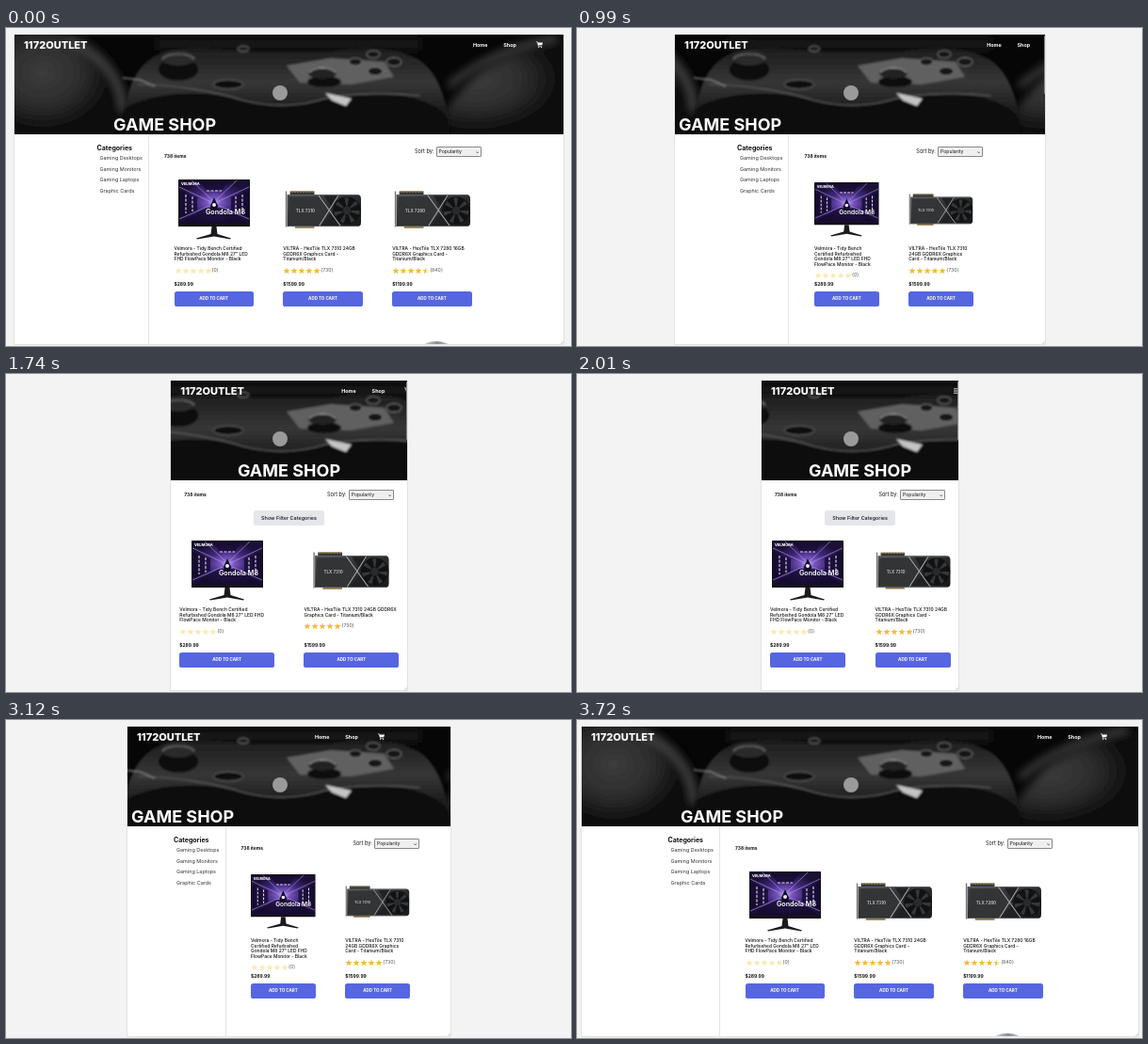
An HTML page for the animation above (3.99 s loop, 600x338 px).

```html
<!DOCTYPE html>
<html lang="en">
<head>
<meta charset="utf-8">
<title>Responsive shop</title>
<style>
html, body { margin: 0; width: 100%; height: 100%; overflow: hidden; background: #f3f3f3; }
.stage { position: relative; width: 600px; height: 338px; overflow: hidden; font: 500 4.9px/5.8px Inter, sans-serif; color: #111; }
.stage * { box-sizing: border-box; }
.win { position: absolute; top: 7px; bottom: 1px; left: 0; right: -1px; margin: 0 auto; width: var(--w); overflow: hidden; background: #fff; container: win / inline-size; }
.edge { position: absolute; top: 7px; bottom: 1px; left: 0; right: -1px; margin: 0 auto; width: var(--w); border: solid #e2e2e2; border-width: 0 1px 1px; }
.photo, .title, .head > *, .side, .count, .sort, .filter, .thumb, .grip { position: absolute; white-space: nowrap; }

.photo { left: 50%; top: 0; width: 600px; height: 106px; margin-left: -300.5px; }
.title { top: 84.7px; left: 5px; font-size: 18px; line-height: 22px; font-weight: 700; color: #fff; }
.head { position: absolute; left: 0; top: 0; width: var(--head); height: 22px; container: head / inline-size; color: #fff; font-size: 5.44px; line-height: 8px; font-weight: 700; }
.head > * { top: 7px; }
.logo { left: 11px; font-size: 11px; font-weight: 800; }
.home { right: 81.5px; }
.shop { right: 51px; }
.cart { right: 23.5px; width: 7px; height: 7px; }
.head > .menu { right: 8.5px; top: 8px; width: 5.5px; height: 6px; display: none; }

.main { position: absolute; left: 0; top: 106px; width: var(--main); height: 225px; container: main / inline-size; }
.wrap { position: relative; width: 261px; height: 225px; margin: 0 auto; }
.side { left: 0; top: 0; width: 55.5px; height: 225px; border-right: 1px solid #e4e4e4; font-size: 5.44px; font-weight: 400; color: #333; }
.side b { display: block; margin-top: 11px; font-size: 7px; line-height: 8px; color: #111; }
.side span { display: block; height: 11.5px; line-height: 12px; padding-left: 3px; }
.count { left: 71.5px; top: 21px; font-weight: 700; }
.sort { right: 0; top: 13.4px; font-size: 5.6px; line-height: 10.4px; font-weight: 400; display: flex; gap: 2px; }
.sort i { position: relative; width: 48px; height: 10.4px; padding-left: 2px; line-height: 9.6px; font-size: 5.1px; font-style: normal; border: .6px solid #888; border-radius: 1px; background: #efefef; }
.sort svg { position: absolute; right: 1.5px; top: 3.4px; width: 3.4px; height: 2.6px; }
.filter { display: none; left: 50%; top: 32px; width: 74.5px; height: 16px; margin-left: -37.2px; border-radius: 2.5px; background: #e5e6eb; font-size: 5.44px; line-height: 16px; text-align: center; }

.grid { position: absolute; left: 82px; right: 10px; top: 0; display: grid; grid-template-columns: 1fr 1fr; grid-auto-rows: 225px; column-gap: 31.5px; }
.card { position: relative; min-width: 0; }
.card:nth-child(n+3) { display: none; }
.pic { position: absolute; left: 0; right: 0; top: 47.5px; height: 64px; }
.pic svg { display: block; width: 100%; height: 100%; margin: 0 auto; }
.name { margin-top: 118.8px; }
.stars { display: flex; align-items: center; height: 8px; margin-top: 4.4px; font-size: 5.2px; font-weight: 400; color: #555; }
.stars svg { width: 40px; height: 8px; }
.price { position: absolute; left: 0; top: 156.5px; font-weight: 700; }
.btn { position: absolute; left: 0; right: 0; top: 167px; height: 15.8px; border-radius: 2.6px; background: #5666e0; color: #fff; font-size: 4.5px; line-height: 15.8px; font-weight: 700; text-align: center; }
.peek { display: none; position: absolute; left: 50%; top: 220px; width: 30px; height: 14px; margin-left: -10px; border-radius: 50%; background: linear-gradient(90deg, #d5d6da, #8b8d94 55%, #d0d1d6); }

.thumb { right: 0; top: 1px; width: 2px; height: 62px; border-radius: 1px; background: #8a8a8a; }
.grip { right: 0; bottom: 0; width: 5px; height: 5px; }

@container win (min-width: 435px) { .title { left: 106px; } .thumb { height: 91px; } }
@container win (max-width: 260.9px) { .title { left: 0; right: 0; text-align: center; } }

@container head (max-width: 260.9px) {
  .home, .shop, .cart { display: none; }
  .head > .menu { display: block; }
}
@container head (max-width: 205px) { .logo { left: 10px; font-size: 5.44px; } }

@container main (min-width: 435px) {
  .wrap { width: 345px; }
  .grid { grid-template-columns: 1fr 1fr 1fr; }
  .card:nth-child(3), .card:nth-child(3) .peek { display: block; }
}
@container main (min-width: 522px) { .wrap { width: 408px; } .pic .screen { width: 76px; } .pic .gpu { width: 83.5px; } }
@container main (max-width: 260.9px) {
  .wrap { width: 100%; }
  .side { display: none; }
  .filter { display: block; }
  .count { left: 15px; top: 12.6px; }
  .sort { right: 15px; top: 10.3px; }
  .grid { left: 10px; right: 9.5px; top: 16px; }
  .pic .screen { width: 76px; }
}
@container main (max-width: 200px) {
  .count { left: 10px; top: 8px; }
  .sort { right: 10.5px; top: 5.4px; }
  .filter { top: 26px; }
  .grid { left: 5px; right: 5px; top: 0; column-gap: 11px; grid-auto-rows: 150px; }
  .card:nth-child(n+3) { display: block; }
  .pic { top: 51.5px; }
  .pic .screen { width: 63px; }
  .pic .gpu { width: 69px; }
  .name { margin-top: 111px; }
  .stars { position: absolute; top: 155px; margin: 0; }
  .price { top: 164.3px; }
  .btn { top: 175px; }
}
</style>
</head>
<body>
<svg width="0" height="0" style="position:absolute">
  <defs>
    <linearGradient id="half"><stop offset=".9" stop-color="#f5b83d"/><stop offset=".9" stop-color="#fbe9b0"/></linearGradient>
    <linearGradient id="metal" x2="1" y2="1"><stop stop-color="#4c4e50"/><stop offset=".5" stop-color="#2b2c2e"/><stop offset="1" stop-color="#18191a"/></linearGradient>
    <radialGradient id="glow"><stop stop-color="#cdb8ff"/><stop offset=".2" stop-color="#7a58c0"/><stop offset=".55" stop-color="#40287a"/><stop offset="1" stop-color="#1c1038"/></radialGradient>
    <linearGradient id="shell" x2="0" y2="1"><stop stop-color="#1c1c1c"/><stop offset=".4" stop-color="#363636"/><stop offset=".75" stop-color="#1a1a1a"/><stop offset="1" stop-color="#060606"/></linearGradient>
    <radialGradient id="palm" cx=".35" cy=".4"><stop stop-color="#3c3c3c"/><stop offset=".6" stop-color="#2c2c2c"/><stop offset="1" stop-color="#101010"/></radialGradient>
    <filter id="soft"><feGaussianBlur stdDeviation="4"/></filter>
    <filter id="fine"><feGaussianBlur stdDeviation=".9"/></filter>
  </defs>
  <symbol id="screen" viewBox="0 0 76 64">
    <rect width="76" height="50" rx=".6" fill="#121216"/>
    <rect x="1.2" y="1.2" width="73.6" height="46" fill="url(#glow)"/>
    <path d="M1 47 28 30H48L75 47ZM1 12 20 19V33L1 40ZM75 12 56 19V33L75 40ZM22 1H54L46 12H30Z" fill="#140a2c" opacity=".75"/>
    <path d="M1 8 33 23M1 42 33 28M75 8 43 23M75 42 43 28M14 1 35 21M62 1 41 21" stroke="#b59bf0" stroke-width=".8" opacity=".8"/>
    <path d="M8 16V36M15 18V34M61 18V34M68 16V36M30 12H46" stroke="#e8dcff" stroke-width="1.1" stroke-dasharray="3 1.5"/>
    <path d="M38 19 42 28 40 38H36L34 28Z" fill="#120a26"/>
    <circle cx="38" cy="27" r="2" fill="#f5edff"/>
    <text x="3" y="6.4" font-size="3.9" font-weight="800" fill="#fff">VELMORA</text>
    <text x="71" y="37" font-size="7.2" font-weight="600" fill="#fff" text-anchor="end">Gondola M8</text>
    <path d="M35.5 50H40.5L41.5 58 56 62.5 55 63.5 38 60.5 20 63.5 19 62.5 34.5 58Z" fill="#1b1b1f"/>
  </symbol>
  <symbol id="gpu" viewBox="1.5 1 79 62">
    <path d="M3 13V50" stroke="#77797b" stroke-width="1.4"/>
    <path d="M7 13H32V18H7Z" fill="#34363a"/>
    <path d="M8 13.6H31" stroke="#a48b4a" stroke-width="1.3" stroke-dasharray="2 1"/>
    <path d="M12 49H32V51.2H12Z" fill="#8b7443"/>
    <path d="M4 16.5H76Q80 16.5 80 21V45Q80 49.5 76 49.5H4Z" fill="url(#metal)"/>
    <path d="M6 19H38L50 33 38 48H6Z" fill="#333436"/>
    <path d="M42 17.5H58L50 30Z" fill="#202123"/>
    <path d="M42 48.5H58L50 36Z" fill="#202123"/>
    <circle cx="65.5" cy="33" r="14.3" fill="#111213"/>
    <circle cx="65.5" cy="33" r="9" fill="none" stroke="#35373a" stroke-width="8.5" stroke-dasharray="3 5.08"/>
    <circle cx="65.5" cy="33" r="4.3" fill="#292a2c"/>
    <path d="M36 17 59 49M57 17 37 49" fill="none" stroke="#a9abad" stroke-width="1"/>
    <path d="M5 17.2H77M5 49H77" stroke="#707275" stroke-width=".7"/>
  </symbol>
</svg>

<div class="stage" id="stage">
  <div class="win">
    <svg class="photo" viewBox="0 7 600 106">
      <rect y="7" width="600" height="106" fill="#060606"/>
      <g filter="url(#soft)">
        <path d="M-10 0H60C95 12 128 40 130 70 131 92 122 104 108 118H-10Z" fill="url(#palm)"/>
        <path d="M66 14C100 28 122 52 124 88" fill="none" stroke="#4a4a4a" stroke-width="5"/>
        <path d="M610 12C570 16 530 28 500 50 475 70 468 90 440 118H610Z" fill="url(#palm)"/>
        <path d="M585 10C540 18 498 36 470 62" fill="none" stroke="#3e3e3e" stroke-width="7"/>
        <path d="M160 10H440V24H160Z" fill="#181818"/>
      </g>
      <g filter="url(#fine)">
        <path d="M126 113C124 75 134 34 172 24 205 17 235 24 262 25H345C380 18 420 20 442 36 462 52 470 85 472 113Z" fill="url(#shell)"/>
        <path d="M298 40 345 32 402 36 412 52 366 60 312 58Z" fill="#606060"/>
        <path d="M126 86C160 64 225 68 250 77 280 86 310 84 334 77 380 66 440 66 466 92L472 113H126Z" fill="#070707"/>
        <path d="M140 60C180 60 225 68 252 77 280 84 305 84 332 77 352 70 400 68 440 72" fill="none" stroke="#5c5c5c" stroke-width="1.2"/>
        <path d="M339 69 367 75 361 83 346 77Z" fill="#c4c4c4"/>
        <ellipse cx="183" cy="44" rx="21" ry="12" fill="#080808"/>
        <ellipse cx="183" cy="32" rx="18" ry="8" fill="#2c2c2c"/>
        <path d="M166 33C172 26 194 26 200 33" fill="none" stroke="#777" stroke-width="1.2"/>
        <path d="M124 53 142 55 158 62" fill="none" stroke="#777" stroke-width="1.6"/>
        <ellipse cx="236" cy="60" rx="16" ry="5" fill="#101010" stroke="#666"/>
        <ellipse cx="338" cy="57" rx="18" ry="6" fill="#0c0c0c"/>
        <ellipse cx="336" cy="48" rx="15" ry="6" fill="#222"/>
        <path d="M322 47C328 41 344 41 350 47" fill="none" stroke="#aaa" stroke-width="1.2"/>
        <g fill="#121212" stroke="#858585" stroke-width=".9">
          <ellipse cx="392" cy="46" rx="8" ry="4.5"/><ellipse cx="412" cy="36" rx="8" ry="4.5"/>
          <ellipse cx="390" cy="28" rx="7" ry="4"/><ellipse cx="371" cy="36" rx="7" ry="4"/>
          <ellipse cx="252" cy="22" rx="6" ry="3"/>
        </g>
      </g>
      <circle cx="291" cy="69" r="8" fill="#9a9a9a"/>
    </svg>
    <div class="title">GAME SHOP</div>
    <div class="head">
      <span class="logo">1172OUTLET</span>
      <span class="home">Home</span>
      <span class="shop">Shop</span>
      <svg class="cart" viewBox="0 0 14 14" fill="#fff"><path d="M0 1H3L3.5 3H14L12.5 8.5H5L5.3 10H12.4V11.2H4.2L2.2 2.3H0Z"/><circle cx="5.5" cy="12.7" r="1.3"/><circle cx="11.2" cy="12.7" r="1.3"/></svg>
      <svg class="menu" viewBox="0 0 11 12"><path d="M0 1.5H11M0 6H11M0 10.5H11" stroke="#fff" stroke-width="1.7"/></svg>
    </div>
    <div class="main">
      <div class="wrap">
        <div class="side"><b>Categories</b><span>Gaming Desktops</span><span>Gaming Monitors</span><span>Gaming Laptops</span><span>Graphic Cards</span></div>
        <div class="count">738 items</div>
        <div class="sort">Sort by: <i>Popularity<svg viewBox="0 0 8 6"><path d="M1 1 4 4.5 7 1" fill="none" stroke="#222" stroke-width="1.5"/></svg></i></div>
        <div class="filter">Show Filter Categories</div>
        <div class="grid" id="grid"></div>
      </div>
    </div>
    <div class="thumb" id="thumb"></div>
    <svg class="grip" viewBox="0 0 5 5"><path d="M.5 5 5 .5M3 5 5 3" stroke="#888" stroke-width=".6"/></svg>
  </div>
  <div class="edge"></div>
</div>

<script>
const LOOP = 3990, STEP = 30, CENTRE2 = 601;

const products = [
  { pic: 'screen', name: 'Velmora - Tidy Bench Certified Refurbished Gondola M8 27" LED FHD FlowPace Monitor - Black', fill: '#fbe9b0', votes: 0, price: '289.99' },
  { pic: 'gpu', model: 'TLX 7310', name: 'VILTRA - HexTile TLX 7310 24GB GDDR6X Graphics Card - Titanium/Black', fill: '#f5b83d', votes: 730, price: '1599.99' },
  { pic: 'gpu', model: 'TLX 7280', name: 'VILTRA - HexTile TLX 7280 16GB GDDR6X Graphics Card - Titanium/Black', fill: 'url(#half)', votes: 840, price: '1199.99' }
];
products.push({ ...products[1] });

function starRow() {
  let d = '';
  for (let s = 0; s < 5; s++) {
    for (let k = 0; k < 10; k++) {
      const r = k % 2 ? 1.55 : 3.8, a = k * Math.PI / 5;
      d += (k ? 'L' : 'M') + (4 + s * 8 + r * Math.sin(a)).toFixed(2) + ' ' + (4.2 - r * Math.cos(a)).toFixed(2);
    }
    d += 'Z';
  }
  return d;
}

const rowPath = starRow();
const viewBoxes = { screen: '0 0 76 64', gpu: '1.5 1 79 62' };

function picture({ pic, model }) {
  const [x, y, w, h] = viewBoxes[pic].split(' ');
  const label = model ? `<text x="13" y="34.5" font-size="4.4" font-weight="600" fill="#c8c8c8">${model}</text>` : '';
  return `<svg class="${pic}" viewBox="${viewBoxes[pic]}"><use href="#${pic}" x="${x}" y="${y}" width="${w}" height="${h}"/>${label}</svg>`;
}

document.getElementById('grid').innerHTML = products.map(p => `
  <div class="card">
    <div class="pic">${picture(p)}</div>
    <div class="name">${p.name}</div>
    <div class="stars"><svg viewBox="0 0 40 8"><path d="${rowPath}" fill="${p.fill}"/></svg>(${p.votes})</div>
    <div class="price">$${p.price}</div>
    <div class="btn">ADD TO CART</div>
    <div class="peek"></div>
  </div>`).join('');

// Left window edge while it is dragged: [ms, px]
const drag = [[0, 8], [480, 37], [540, 51], [630, 51.5], [1080, 116], [1350, 149.5], [1470, 151],
  [1620, 161], [1890, 191], [2010, 195], [2160, 204], [2460, 218.5], [2640, 219], [3000, 152],
  [3120, 128], [3240, 88], [3600, 9.5], [3720, 4], [LOOP, 4]];

function widthAt(t) {
  t = Math.min(Math.max(t, 0), LOOP);
  const i = Math.max(1, drag.findIndex(p => p[0] >= t));
  const [t0, x0] = drag[i - 1], [t1, x1] = drag[i];
  return CENTRE2 - 2 * (x0 + (x1 - x0) * (t - t0) / (t1 - t0));
}

const stage = document.getElementById('stage'), thumb = document.getElementById('thumb');
const setWidth = (name, px) => stage.style.setProperty(name, px.toFixed(2) + 'px');

function draw(now) {
  const t = Math.floor(now % LOOP / STEP) * STEP;
  const w = widthAt(t);
  setWidth('--w', w);
  setWidth('--head', widthAt(t - 120)); // the navigation reflows late
  setWidth('--main', Math.max(w, widthAt(t + 24)));
  thumb.style.visibility = t >= 60 && t < 2700 ? 'visible' : 'hidden';
}

const start = performance.now();
function tick() {
  draw(performance.now() - start);
  requestAnimationFrame(tick);
}
tick();
</script>
</body>
</html>
```
